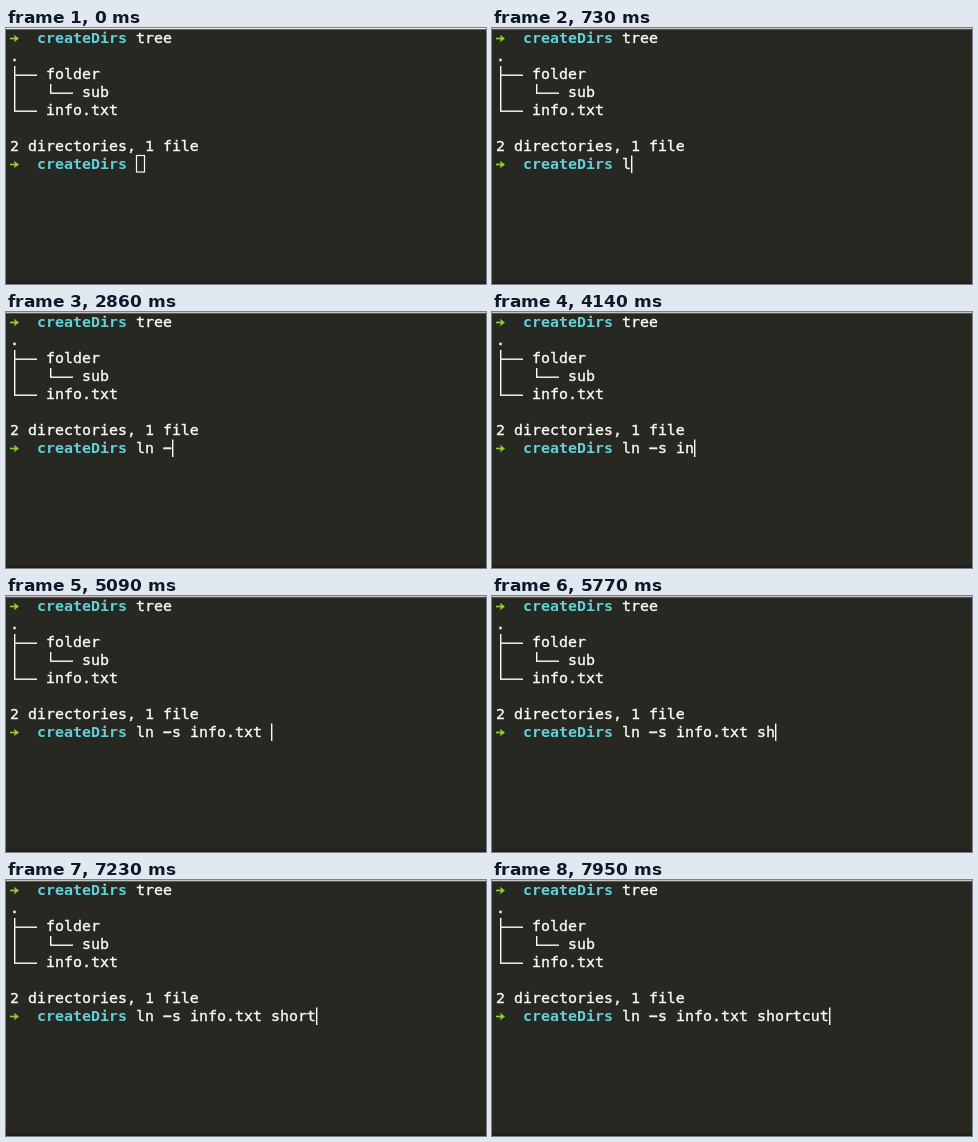
An HTML page with a canvas that plays this animation: 480x256 px, repeating every 8 s.

```html
<!DOCTYPE html>
<html lang="en">
<head>
<meta charset="utf-8">
<title>Terminal</title>
<style>
html, body { margin: 0; width: 100%; height: 100%; overflow: hidden; background: #282822; }
canvas { display: block; width: 480px; height: 256px; }
</style>
</head>
<body>
<canvas id="stage" width="480" height="256"></canvas>
<script>
const ctx = document.getElementById('stage').getContext('2d');
const LOOP = 8000;
const CELL = 9, LINE = 18, LEFT = 4, TOP = 2;
const BASELINE = 13.4, MIDDLE = 8.5;
const FONT = '14.95px "DejaVu Sans Mono", monospace';
const WHITE = '#fbfbf8', CYAN = '#62d0d6', GREEN = '#8fd035';
const FOCUS_TIME = 400;

// [time, typed command]; the dash is drawn with the wide minus glyph
const typing = [
  [0, ''], [700, 'l'], [1100, 'ls'], [1800, 'l'], [2100, 'ln'],
  [2400, 'ln '], [2650, 'ln -'], [3000, 'ln -s'], [3400, 'ln -s '],
  [3700, 'ln -s i'], [4000, 'ln -s in'], [4500, 'ln -s info.txt '],
  [5250, 'ln -s info.txt s'], [5600, 'ln -s info.txt sh'],
  [5950, 'ln -s info.txt sho'], [6300, 'ln -s info.txt shor'],
  [6550, 'ln -s info.txt short'], [7500, 'ln -s info.txt shortc'],
  [7650, 'ln -s info.txt shortcu'], [7850, 'ln -s info.txt shortcut']
];

const colX = col => LEFT + col * CELL;
const rowY = row => TOP + row * LINE;

function write(text, col, row, color = WHITE, bold = false) {
  const glyphs = text.replace(/-/g, '\u2212');
  const x = colX(col), y = rowY(row) + BASELINE;
  ctx.font = (bold ? 'bold ' : '') + FONT;
  ctx.fillStyle = ctx.strokeStyle = color;
  ctx.fillText(glyphs, x, y);
  if (!bold) {
    // a hairline outline gives the regular weight its fuller stems
    ctx.lineWidth = 0.35;
    ctx.strokeText(glyphs, x, y);
  }
}

function rect(x, y, w, h, color = WHITE) {
  ctx.fillStyle = color;
  ctx.fillRect(x, y, w, h);
}

function arrow(row) {
  const y = rowY(row) + MIDDLE;
  rect(4, y - 0.8, 5, 1.6, GREEN);
  ctx.beginPath();
  ctx.moveTo(8, y - 3.7);
  ctx.lineTo(13, y);
  ctx.lineTo(8, y + 3.7);
  ctx.lineTo(9, y);
  ctx.fill();
}

function prompt(row, command) {
  arrow(row);
  write('createDirs', 3, row, CYAN, true);
  write(command, 14, row);
}

function branch(col, row) {
  rect(colX(col) + 4, rowY(row) + MIDDLE, 23, 1.4);
}

function trunk(col, row, lines) {
  rect(colX(col) + 4, rowY(row), 1.4, (lines - 0.5) * LINE);
}

function tree() {
  write('.', 0, 1);
  trunk(0, 2, 3);
  branch(0, 2);
  write('folder', 4, 2);
  trunk(4, 3, 1);
  branch(4, 3);
  write('sub', 8, 3);
  branch(0, 4);
  write('info.txt', 4, 4);
  write('2 directories, 1 file', 0, 6);
}

function cursor(length, focused) {
  const x = colX(14 + length), y = rowY(7);
  if (focused) {
    rect(x, y - 0.5, 1.4, 17.5);
  } else {
    ctx.strokeStyle = WHITE;
    ctx.lineWidth = 1.2;
    ctx.strokeRect(x + 0.5, y - 0.5, 8, 16.5);
  }
}

function draw(t) {
  const focused = t >= FOCUS_TIME;
  rect(0, 0, 480, 256, '#282822');
  rect(0, 0, 480, 1.3, focused ? '#c4c4c2' : '#f0f0ee');
  rect(0, 253, 480, 3, '#291d1b');
  prompt(0, 'tree');
  tree();
  const command = typing.filter(step => step[0] <= t).pop()[1];
  prompt(7, command);
  cursor(command.length, focused);
}

const start = performance.now();
function frame() {
  draw((performance.now() - start) % LOOP);
  requestAnimationFrame(frame);
}
frame();
</script>
</body>
</html>
```
